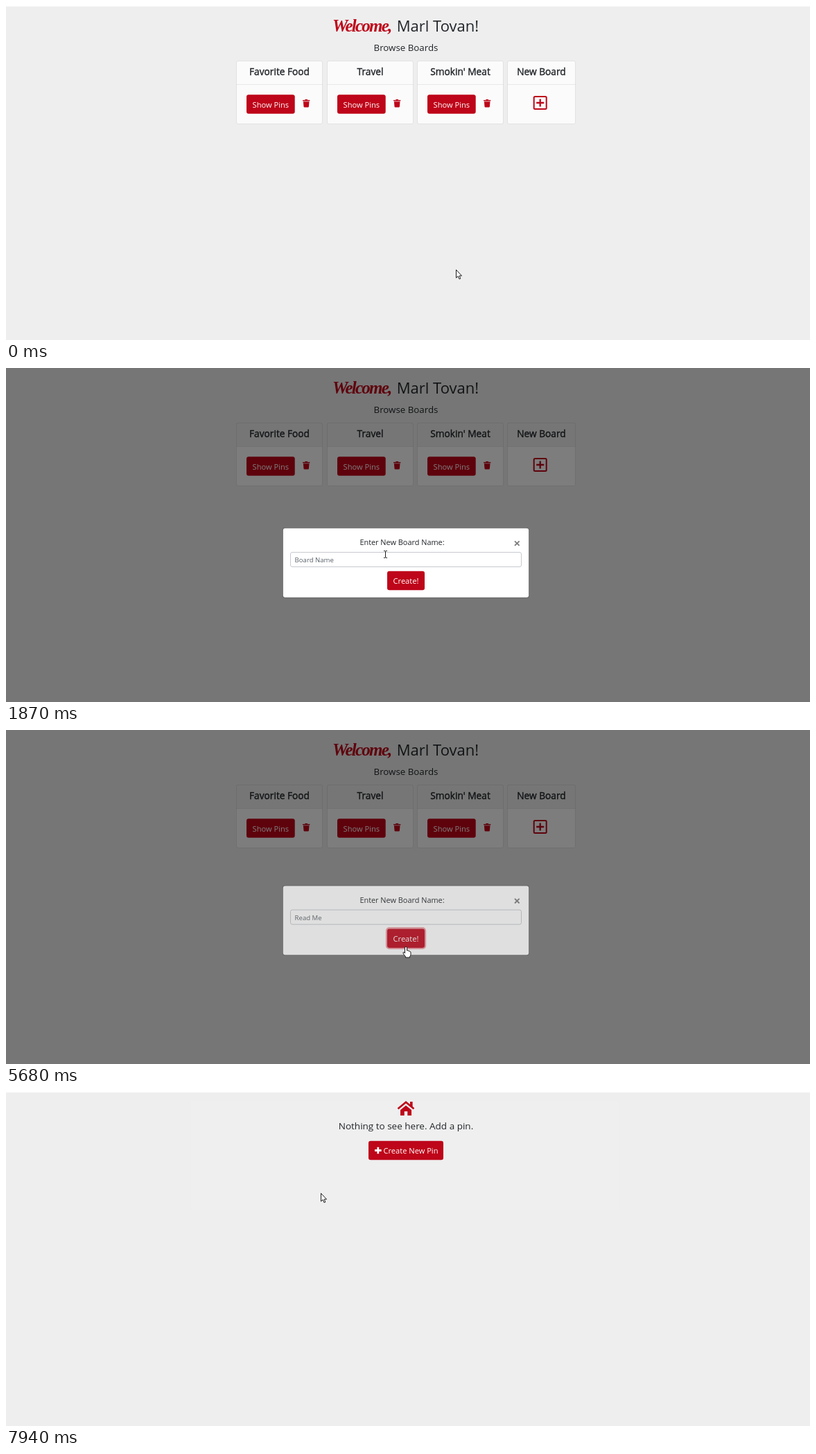
These frames come from a looping animation (1160x483 px, 8000 ms). An HTML page:

```html
<!DOCTYPE html>
<html lang="en">
<head>
<meta charset="utf-8">
<title>Boards</title>
<style>
  html, body { margin: 0; width: 100%; height: 100%; overflow: hidden; background: #eee; }
  svg { display: block; width: 1160px; height: 483px; font-family: "Open Sans", "Noto Sans", sans-serif; fill: #212529; }
  .mid { text-anchor: middle; }
  .title { stroke: #212529; stroke-width: .4px; }
  .brand { font: italic bold 25px "Liberation Serif", serif; letter-spacing: -1.8px; fill: #be0519; }
  .pointer { stroke: #111; stroke-width: .95; stroke-linejoin: round; fill: #fff; }
</style>
</head>
<body>
<svg id="stage" viewBox="0 0 1160 483"></svg>
<script>
const LOOP = 8000, RED = '#be0519', CENTER = 577;
const stage = document.getElementById('stage');
const pen = document.createElement('canvas').getContext('2d');

const ticks = [0, 290, 430, 570, 720, 860, 1140, 1270, 1420, 1570, 1720, 1870, 2000, 2140, 2510,
  3380, 3550, 3840, 3970, 4100, 4220, 4350, 4950, 5090, 5230, 5380, 5540, 5680, 5830, 5950,
  6100, 6810, 6950, 7100, 7250, 7400, 7940];
const keyTimes = [3380, 3550, 3840, 3970, 4100, 4220, 4350];

const moves = [
  { start: 290, end: 860, to: [774.5, 144.5] },
  { start: 1570, end: 1870, to: [547.5, 269.5] },
  { start: 4950, end: 5230, to: [576.5, 313.5] },
  { start: 6810, end: 7400, to: [454.5, 146.5] }
];
const pointers = {
  arrow: '<path d="M0 0V11.6L2.7 9.2 4.5 13.4 6.3 12.6 4.6 8.6H8Z"/>',
  hand: '<path transform="translate(.5)" d="M-1.5 1.3Q-1.3 0 0 0T1.5 1.3V5.5Q3 4.6 3.9 6 5.2 5.4 5.6 7 7 6.8 7 8.3V11Q7 13 5.6 14V15.5H-.6V14Q-2.6 12-3.9 9.4-4.5 8-3.2 7.8-2.2 7.8-1.5 9.2Z"/>',
  beam: '<path fill="none" d="M-2.5-5H-.8L0-4.5.8-5H2.5M0-4.5V4.5M-2.5 5H-.8L0 4.5.8 5H2.5"/>'
};

const clamp = v => Math.max(0, Math.min(1, v));
const smooth = p => p * p * (3 - 2 * p);
const easeOut = p => 1 - (1 - p) ** 1.8;
const within = (t, a, b) => t >= a && t < b;

const text = (x, y, size, content, attrs = 'class="mid"') =>
  `<text x="${x}" y="${y}" font-size="${size}" ${attrs}>${content}</text>`;
const rect = (x, y, w, h, fill, attrs = '') =>
  `<rect x="${x}" y="${y}" width="${w}" height="${h}" fill="${fill}" ${attrs}/>`;
const button = (x, y, w, label, focused, labelX = x + w / 2) =>
  (focused ? rect(x - 1, y - 1, w + 2, 29.5, 'none', 'rx="4" stroke="#dc3545" stroke-opacity=".5" stroke-width="2.2"') : '') +
  rect(x, y, w, 27.5, RED, 'rx="3"') +
  text(labelX, y + 18.2, 11.1, label, 'class="mid" fill="#fff"');

function card(x, w, title, t, body) {
  const fill = t === 1140 ? 'none' : '#fbfbfb';
  const shade = within(t, 1270, 5950) ? .05 : 0;
  return rect(x, 79.5, w, 91, fill, 'rx="2.5" stroke="#000" stroke-opacity=".075"') +
    rect(x, 79.5, w, 34, '#000', `opacity="${shade}"`) +
    `<path d="M${x} 113.5h${w}" stroke="#000" stroke-opacity=".075"/>` +
    text(x + w / 2, 99.5, 13.7, title, 'class="mid title"') + body;
}

function board(x, title, t, focused) {
  const trash = `<path fill="${RED}" d="M${x + 95.6} 136h3l.6-1.1h3l.6 1.1h3v1.5h-10.2zM${x + 96.4} 138.2h8.6l-.6 7.3q-.1 1.1-1.2 1.1h-5q-1.1 0-1.2-1.1z"/>`;
  return card(x, 124, title, t, button(x + 14.5, 128.3, 69.7, 'Show Pins', focused) + trash);
}

function boardsPage(t) {
  const added = t >= 6100;
  const names = ['Favorite Food', 'Travel', "Smokin' Meat"];
  if (added) names.splice(1, 0, 'Read Me');
  const left = added ? 267 : 332;
  const newX = added ? 788.5 : 723.5;
  const newW = added ? 96 : 98;
  const px = newX + newW / 2 - 1.8;
  const plus = `<g fill="none" stroke="${RED}"><rect x="${px - 9}" y="131" width="18" height="18" rx="1.5" stroke-width="2"/>` +
    `<path stroke-width="2.3" d="M${px - 5.5} 140h11M${px} 134.5v11"/></g>`;
  return text(471, 36.7, 25, 'Welcome,', 'class="brand"') +
    text(563.7, 36.8, 22, 'Marl Tovan!', '') +
    text(CENTER, 64.5, 13.3, 'Browse Boards') +
    names.map((name, i) => board(Math.round(left + i * 130.5) + .5, name, t, t >= 7400 && i === 1)).join('') +
    card(newX, newW, 'New Board', t, plus);
}

function pinsPage() {
  return rect(267, 13, 617, 158, '#efefef') +
    `<g fill="${RED}"><path d="M565.5 24.3 577 14.8l11.5 9.5" fill="none" stroke="${RED}" stroke-width="2.7"/>` +
    '<path d="M583 14h3.6v8l-3.6-3zM569 26l8-6.6 8 6.6v8h-5.7v-6h-4.6v6H569z"/></g>' +
    text(CENTER, 53.7, 13.5, 'Nothing to see here. Add a pin.') +
    button(523, 70.7, 108, 'Create New Pin', false, 584) +
    '<path d="M532 84.5h9.6M536.8 79.7v9.6" stroke="#fff" stroke-width="2.8"/>';
}

function dialog(t) {
  const opening = t < 5600;
  const shown = opening ? clamp((t - 1275) / 150) : clamp(1 - (t - 5645) / 150);
  if (!shown) return '';
  const slide = easeOut(clamp((t - (opening ? 1275 : 5645)) / 300));
  const dy = -32 * (opening ? 1 - slide : slide);
  const focus = t < 5300 ? clamp((t - 1930) / 150) : 0;
  const typed = 'Read Me'.slice(0, keyTimes.filter(k => t >= k).length);
  pen.font = '9.6px "Open Sans", "Noto Sans", sans-serif';
  const caretX = 417.2 + pen.measureText(typed).width;
  const caret = focus === 1 && !within(t, 2510, 3380);
  return `<g opacity="${shown}" transform="translate(0 ${dy})">` +
    rect(399, 231, 356, 101.5, '#000', 'rx="3.5" opacity=".2"') +
    rect(399.8, 231.8, 354.4, 99.9, '#fff', 'rx="3"') +
    text(571.5, 256, 10.9, 'Enter New Board Name:') +
    '<path d="M734 250.3l6.6 6.6m0-6.6-6.6 6.6" stroke="#7f7f7f" stroke-width="1.9"/>' +
    rect(409.5, 265.5, 335, 23, 'none', `rx="3" stroke="#80bdff" stroke-width="3.4" opacity="${focus * .6}"`) +
    rect(410.5, 266.5, 333, 21, '#fff', `rx="2.5" stroke="${focus ? '#80bdff' : '#c6cacf'}"`) +
    text(416.6, 281, 9.6, typed || 'Board Name', 'fill="#596168"') +
    (caret ? rect(caretX, 271, .9, 12, '#222') : '') +
    button(550, 293.8, 54, 'Create!', t >= 5380) + '</g>';
}

function pointer(t) {
  let [x, y] = [649.5, 381.5];
  for (const { start, end, to } of moves) {
    if (t < start) break;
    const p = smooth(clamp((t - start + 140) / (end - start + 140)));
    x += (to[0] - x) * p;
    y += (to[1] - y) * p;
  }
  const kind = within(t, 1870, 5090) ? 'beam'
    : within(t, 860, 1140) || within(t, 5230, 5950) || within(t, 7400, 7940) ? 'hand' : 'arrow';
  return `<g class="pointer" transform="translate(${x} ${y})">${pointers[kind]}</g>`;
}

function render(t) {
  const modalOpen = within(t, 1140, 5950);
  const dim = modalOpen ? .5 * clamp((t - 1125) / 150) : 0;
  stage.innerHTML = rect(0, 0, 1160, 483, '#eee') +
    (modalOpen ? '' : rect(0, 0, 1160, 1, '#fafafa')) +
    (t < 7940 ? boardsPage(t) : pinsPage()) +
    (modalOpen ? rect(0, 0, 1160, 483, '#000', `opacity="${dim}"`) + dialog(t) : '') +
    pointer(t);
}

let shownTick = -1;
function frame() {
  const now = performance.now() % LOOP;
  const tick = ticks.findLast(t => t <= now);
  if (tick !== shownTick) render(shownTick = tick);
  requestAnimationFrame(frame);
}
frame();
</script>
</body>
</html>
```
